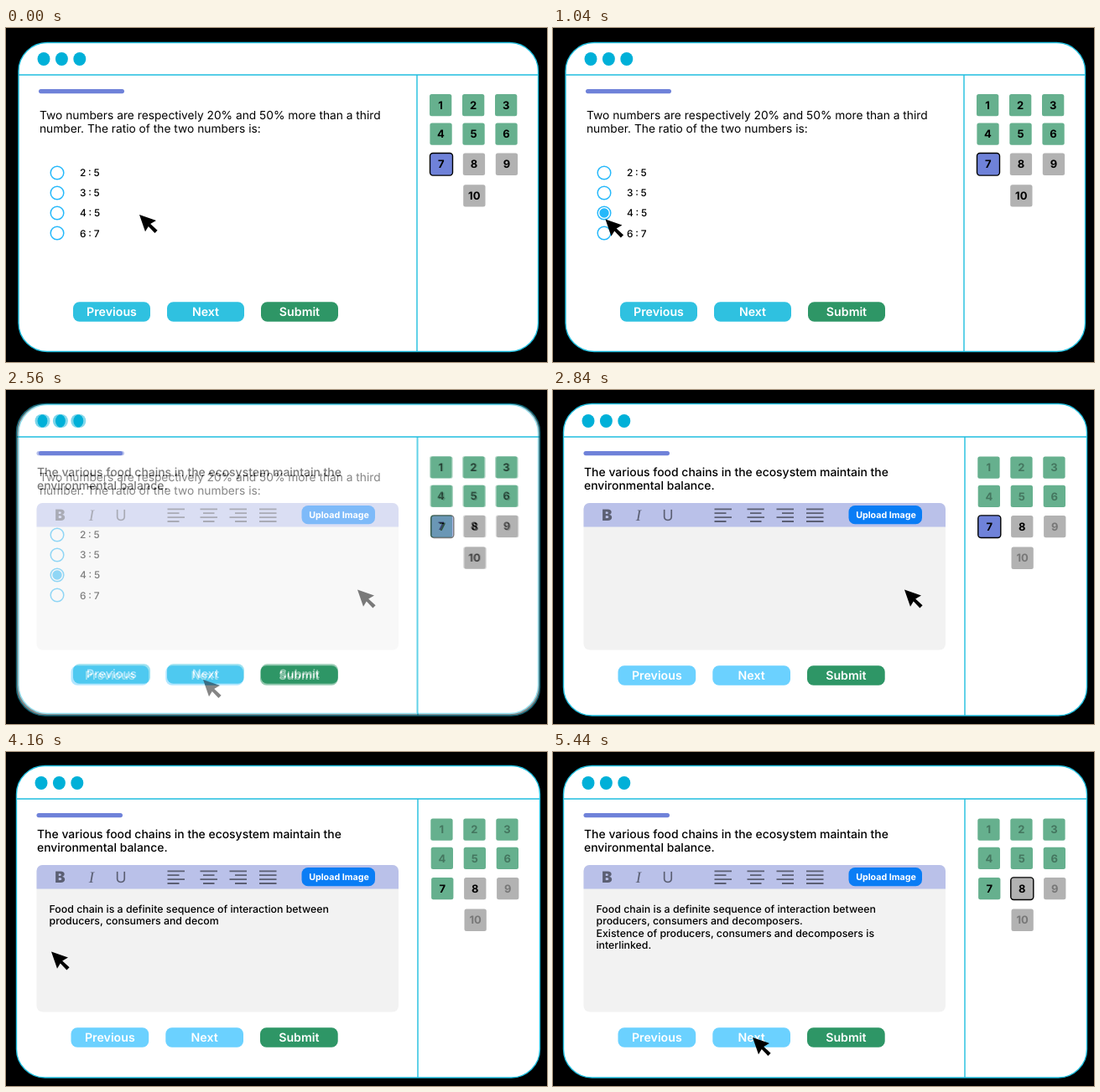
An HTML page that plays this animation: 645 px wide and 399 px high, repeating every 5480 ms.

```html
<!DOCTYPE html>
<html lang="en">
<head>
<meta charset="utf-8">
<title>Online quiz</title>
<style>
  html, body { margin: 0; width: 100%; height: 100%; overflow: hidden; background: #000; }
  svg { display: block; font-family: Inter, "Open Sans", sans-serif; text-rendering: geometricPrecision; }
  .mid { text-anchor: middle; }
</style>
</head>
<body>
<svg id="stage" width="645" height="399" viewBox="0 0 645 399"></svg>
<script>
const LOOP = 5480;
const GREEN = '#66b08e', GRAY = '#b2b2b2', BLUE = '#6f82d9', CYAN = '#00b0d8';
const ANSWER = [
  'Food chain is a definite sequence of interaction between',
  'producers, consumers and decomposers.',
  'Existence of producers, consumers and decomposers is',
  'interlinked.'
];

const rect = (x, y, w, h, r, fill, more = '') =>
  `<rect x="${x}" y="${y}" width="${w}" height="${h}" rx="${r}" fill="${fill}" ${more}/>`;
const text = (x, y, size, weight, str, more = '') =>
  `<text x="${x}" y="${y}" font-size="${size}" font-weight="${weight}" ${more}>${str}</text>`;
const line = (d, width, color) => `<path d="${d}" stroke="${color}" stroke-width="${width}" fill="none"/>`;

const frame = (x, y, w, h, divider, dotX) =>
  rect(x, y, w, h, 34, '#fff', 'stroke="#20bfdf" stroke-width="1.4"') +
  line(`M${x} 56H${x + w}M${divider} 56V${y + h}`, 1.4, '#20bfdf') +
  [0, 21.4, 42.8].map(d => `<ellipse cx="${dotX + d}" cy="37" rx="7.5" ry="8" fill="${CYAN}"/>`).join('');

const button = (x, y, w, label, fill) =>
  rect(x, y, w, 23.5, 7.5, fill) +
  text(x + w / 2, y + 17, 14.2, 600, label, 'class="mid" fill="#fff"');

// A numbered tile, optionally with a fading highlight under its number
const tile = (n, x, y, fill, muted, mark) =>
  rect(x, y, 26.3, 26.3, 2.5, fill) +
  (mark ? rect(x - .3, y - .1, 27, 26.6, 3.5, mark.fill, `id="${mark.id}" stroke="#000" stroke-width="1.4"`) : '') +
  text(x + 13.1, y + 17.8, 13, 700, n, `class="mid" fill-opacity="${muted ? .33 : 1}"`);

function tiles(x, y, mutes, marks) {
  let out = '';
  for (let n = 1; n <= 10; n++) {
    const row = Math.floor((n - 1) / 3), col = n === 10 ? 1 : (n - 1) % 3;
    out += tile(n, x + col * 39 + row * .4, y + [0, 34.4, 70.6, 108.2][row],
      n < 8 ? GREEN : GRAY, mutes && n !== 7 && n !== 8, marks[n]);
  }
  return out;
}

const cursor = id =>
  `<path id="${id}" d="M0 0L20 7 13.2 11 21.6 18.8 18.4 22 10.8 14 7 20.2Z"/>`;

const choices = ['2 : 5', '3 : 5', '4 : 5', '6 : 7'].map((label, i) =>
  `<circle cx="61" cy="${173 + 24 * i}" r="7.8" fill="#fff" stroke="#25b8fa" stroke-width="1.5"/>` +
  text(88, 177 + 24.2 * i, 11.9, 500, label, 'word-spacing="-.4"')).join('');

const quiz =
  frame(15, 17.5, 619.5, 369, 490, 45) +
  rect(39, 73, 102, 5.2, 2.6, BLUE) +
  text(40, 109, 13.75, 400, 'Two numbers are respectively 20% and 50% more than a third') +
  text(40, 125, 13.75, 400, 'number. The ratio of the two numbers is:') +
  choices + '<circle id="pick" cx="61" cy="221" r="5.7" fill="#25b8fa"/>' +
  button(80, 327.3, 92, 'Previous', '#2fc1e0') +
  button(192, 327.3, 92, 'Next', '#2fc1e0') +
  button(304, 327.3, 92, 'Submit', '#2e9666') +
  tiles(505, 79, false, { 7: { id: 'quiz7', fill: BLUE } }) +
  cursor('quizCursor');

// Each icon lists the start and length of its four strokes
const icon = (x, rows) => line(rows.map(([s, w], i) => `M${x + s} ${142.3 + 4.9 * i}h${w}`).join(''), 1.8, '#5b5f73');
const full = [0, 20.5];

const essay =
  frame(12.5, 16.5, 624, 372.5, 491, 42) +
  rect(36.5, 73, 102.5, 5.2, 2.6, BLUE) +
  text(37, 102.5, 13.95, 500, 'The various food chains in the ecosystem maintain the') +
  text(37, 118.5, 13.95, 500, 'environmental balance.') +
  rect(36.5, 135, 431.5, 175.5, 7, '#f2f2f2') +
  '<path d="M36.5 163.5V142a7 7 0 0 1 7-7H461a7 7 0 0 1 7 7V163.5Z" fill="#bac1e9"/>' +
  '<g class="mid" fill="#5b5f73">' +
  text(64.5, 156, 18.5, 900, 'B') +
  text(102, 156, 19, 400, 'I', 'font-family="Liberation Serif, serif" font-style="italic"') +
  text(137, 156, 18, 400, 'U') + '</g>' +
  icon(192.5, [full, [0, 14], full, [0, 14]]) +
  icon(231.5, [full, [3.5, 13.5], full, [3.5, 13.5]]) +
  icon(266.5, [full, [6.5, 14], full, [6.5, 14]]) +
  icon(302, [full, full, full, full]) +
  rect(352.5, 138, 87.5, 22.3, 7.5, '#0a7df5') +
  text(397, 153, 10.7, 700, 'Upload Image', 'class="mid" fill="#fff"') +
  ANSWER.map((_, i) => text(51.5, 192 + 14.3 * i, 12.35, 500, '', 'class="answer"')).join('') +
  button(77.5, 329.3, 92.7, 'Previous', '#6bd1ff') +
  button(190.3, 329.3, 92.7, 'Next', '#6bd1ff') +
  button(303, 329.3, 92.7, 'Submit', '#2e9666') +
  tiles(506.3, 79.4, true, { 7: { id: 'essay7', fill: BLUE }, 8: { id: 'essay8', fill: GRAY } }) +
  cursor('essayCursor');

const $ = id => document.getElementById(id);
$('stage').innerHTML = `<g id="quiz">${quiz}</g><g id="essay">${essay}</g>`;
const answerLines = document.querySelectorAll('.answer');

const ramp = (t, from, to) => Math.min(1, Math.max(0, (t - from) / (to - from)));
const ease = s => s * s * (3 - 2 * s);
const fade = (id, value) => $(id).setAttribute('opacity', value);

// Moves are [start, end, x, y]: each eases from the last place to a new one
function place(id, t, x, y, moves) {
  for (const [from, to, nx, ny] of moves) {
    const k = ease(ramp(t, from, to));
    x += (nx - x) * k;
    y += (ny - y) * k;
  }
  $(id).setAttribute('transform', `translate(${x} ${y})`);
}

function draw(t) {
  place('quizCursor', t, 159, 223, [[40, 770, 61, 227.5], [1000, 1760, 235, 346]]);
  fade('pick', ramp(t, 800, 960));
  fade('quiz7', 1 - ramp(t, 1240, 1560));

  fade('essay', ramp(t, 2300, 2800));
  place('essayCursor', t, 419, 238.5, [[2840, 3440, 54, 238.5], [4530, 5230, 238, 341]]);
  fade('essay7', 1 - ramp(t, 3820, 4120));
  fade('essay8', ramp(t, 5200, 5420));

  let typed = Math.floor(ramp(t, 3580, 4630) * ANSWER.join('').length);
  ANSWER.forEach((str, i) => {
    answerLines[i].textContent = str.slice(0, Math.max(0, typed));
    typed -= str.length;
  });
}

const start = performance.now();
function tick() {
  draw((performance.now() - start) % LOOP);
  requestAnimationFrame(tick);
}
tick();
</script>
</body>
</html>
```
